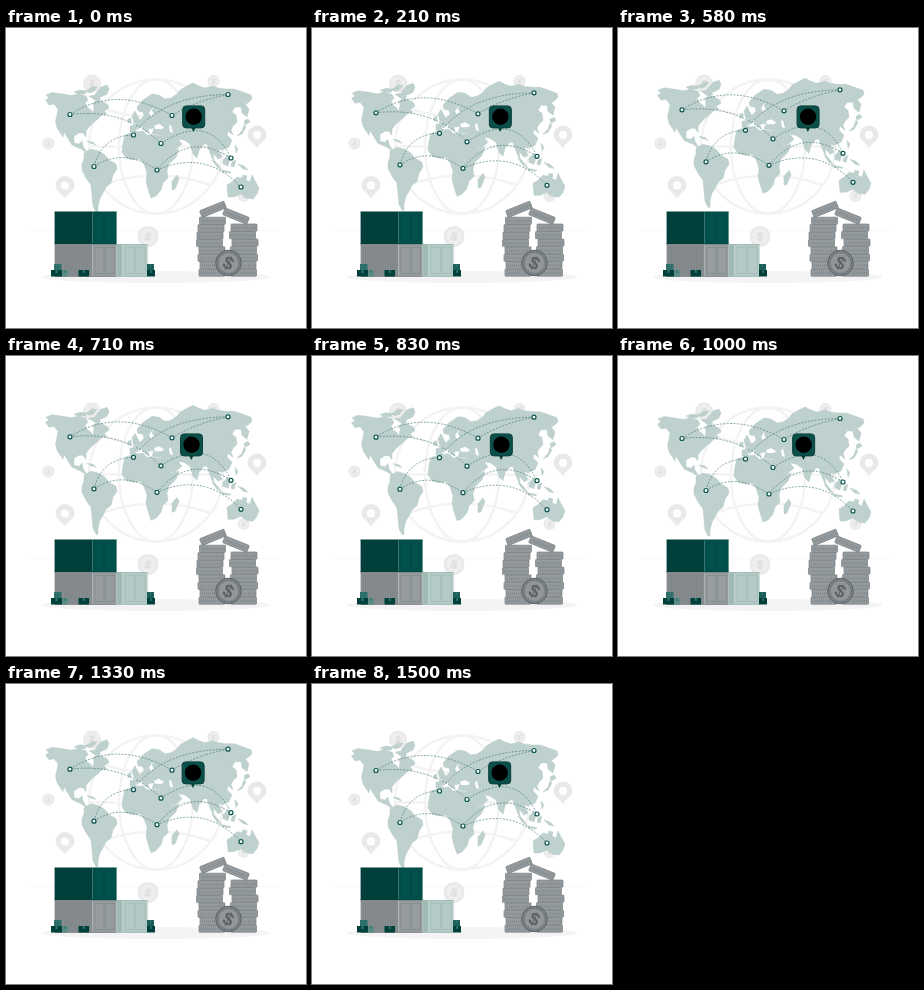
Recreate the animation shown at these times as an HTML page. Size 300x300 px, loop 1.54 s.

```html
<!DOCTYPE html>
<html lang="en">
<head>
<meta charset="utf-8">
<title>World shipping</title>
<style>
  html, body { margin: 0; width: 100%; height: 100%; overflow: hidden; background: #fff; }
  svg { display: block; width: 100vw; height: 100vh; }
  text { font-family: "Liberation Sans", Arial, sans-serif; font-weight: bold; text-anchor: middle; }
</style>
</head>
<body>
<svg viewBox="0 0 300 300">
  <g id="globe" fill="none" stroke="#f3f3f3" stroke-width="2.4">
    <circle cx="150" cy="118.5" r="67"/>
    <ellipse cx="150" cy="118.5" rx="37" ry="67"/>
    <path d="M83 118.500H217M96 80Q150 99 204 80M96 157Q150 138 204 157"/>
  </g>
  <path d="M23 202.500H273" stroke="#f3f3f3" stroke-width=".6"/>
  <g id="tokens"></g>

  <g id="map">
    <g fill="#bfd1cf" stroke="#aec4c1" stroke-width=".4" stroke-linejoin="round">
      <path d="M39.500 72L43 70 40 67 46 64.500 57 66 65 67.500 72 66 80 68 82 72 79 75 81 79 85 82 87 85 88 79 87 75 92 72 97 74 102 77 103 80 98 83 101 86 96 87 92 91 87 95 83 99 80 103 80 109 77 105 73 105 68 108 68 115 73 116 76 113 77 118 80 123 85 125 82 126 75 121 66 117 61 109 58 104 57 109 51 100 49.500 93 51 87 52 81 48 76 43 77Z"/>
      <path d="M68 64L74 62 81 63 79 66 72 66ZM80 63L86 59 91 59 88 63 83 65ZM83 68L90 67 95 71 90 73 86 70Z"/>
      <path d="M89 66L95 59 101 57 103 61 101 66 97 68 92 70Z"/>
      <path d="M81 113L87 114 90 117 84 115Z"/>
      <path d="M78 125L85 121 93 123 99 127 103 132 110 136 111 141 107 147 105 155 100 159 97 165 94 170 92 178 92 184 90 184 87 178 86 168 85 157 80 150 76 142 76 136 78 131Z"/>
      <path d="M126 88L129 83 132 89 134 93 128 95ZM122 91L125 90 125 94 122 95Z"/>
      <path d="M119 107L128 104 137 103 141 107 148 107 155 108 159 116 164 123 173 121 170 129 163 136 161 143 162 150 157 155 155 162 150 168 145 170 142 161 140 153 141 145 138 136 134 131 127 132 120 130 116 124 117 115Z"/>
      <path d="M171 147L173 151 169 161 166 162 166 153Z"/>
      <path d="M124 104L124 98 130 97 129 94 134 92 138 88 137 84 132 83 131 79 137 72 146 66 153 67 159 71 165 70 171 66 174 62 181 58 187 55 193 58 199 60 207 58 212 60 220 61 228 61 234 63 245 67 246 71 242 75 239 76 243 81 241 89 236 85 235 79 229 79 226 84 230 87 231 94 227 98 225 102 227 107 222 103 221 107 226 112 223 119 216 122 212 121 216 129 212 131 207 125 208 132 213 138 208 134 204 125 201 116 198 116 193 122 191 130 187 126 184 116 178 112 172 111 176 116 170 121 162 123 156 114 155 107 146 106 148 100 142 101 143 105 139 103 135 98 130 101 128 105Z"/>
      <path d="M238 93L242 91 244 94 239 97ZM238 97L240 99 236 106 231 108 236 103ZM229 117L232 121 230 125ZM206 132L211 136 216 142 211 139ZM217 132L222 127 224 131 222 138 217 136ZM216 142L225 144 224 145 216 144ZM226 134L230 132 228 139 225 138ZM232 136L238 138 242 142 237 141Z"/>
      <path d="M221 157L226 154 231 149 236 150 237 147 241 148 240 152 244 154 246 147 249 153 253 160 251 166 247 171 240 170 235 166 228 169 222 169Z"/>
      <path fill="#fff" stroke="none" d="M143 85L145 82 147 79 146 83 148 86 145 88ZM148 98L153 96 158 99 156 101 149 101ZM163 98L165 97 167 105 164 104Z"/>
    </g>
    <path fill="none" stroke="#356d68" stroke-width=".6" stroke-dasharray="2 1.4"
      d="M64 86.500Q111 56 166 87.500M64 86.500Q119 80 155 115.500M127 107Q157 67 222 66.500M166 87.500Q189 73 222 66.500M88 138.500Q96 108 127 107M88 138.500Q117 119 151 142M155 115.500Q203 84 225 130M151 142Q183 103 225 130M151 142Q199 121 235 159"/>
    <g id="stops"></g>
  </g>

  <g id="pin">
    <path d="M185 99H190L187.500 104Z" fill="#073c38"/>
    <rect x="176.700" y="77.900" width="22" height="22" rx="3.500" fill="#0b4f49" stroke="#0a403c"/>
    <circle cx="187.700" cy="88.700" r="8.200"/>
  </g>

  <ellipse cx="150" cy="249" rx="115" ry="6" fill="#f4f4f4"/>
  <g id="cargo"></g>
  <g id="coins"></g>
</svg>
<script>
const $ = id => document.getElementById(id);
const add = (id, html) => $(id).insertAdjacentHTML("beforeend", html);
const rect = (x, y, w, h, fill, more = "") =>
  `<rect x="${x}" y="${y}" width="${w}" height="${h}" fill="${fill}" ${more}/>`;

// Pale coins and location pins behind the map
for (const [x, y, r] of [[86, 55.5, 9], [207.5, 53, 6], [42.5, 115.5, 6], [237.5, 168, 6], [142, 208.5, 10.5]])
  add("tokens", `<circle cx="${x}" cy="${y}" r="${r}" fill="#e9e9e9"/>
    <circle cx="${x}" cy="${y}" r="${r * .78}" fill="#eee"/>
    <text x="${x}" y="${y + r * .4}" font-size="${r * 1.15}" fill="#dcdcdc" transform="rotate(18 ${x} ${y})">$</text>`);
for (const [x, y] of [[59, 157.5], [251, 107]])
  add("tokens", `<path transform="translate(${x} ${y})" fill="#e9e9e9"
    d="M0 13C-3 8-9.500 5-9.500 0A9.500 9.500 0 0 1 9.500 0C9.500 5 3 8 0 13Z"/>
    <circle cx="${x}" cy="${y}" r="4" fill="#fff"/>`);

for (const [x, y] of [[64, 86.5], [222, 66.5], [166, 87.5], [127.5, 107], [155, 115.5], [225, 130], [88, 138.5], [151, 142], [235, 159]])
  add("stops", `<circle cx="${x}" cy="${y}" r="2" fill="#fff" stroke="#0a544e" stroke-width="1.2"/>`);

// Containers: ribbed side on the left, framed doors on the right
function container(x, y, side, doors, fill, doorFill, line) {
  const split = x + side;
  let html = rect(x, y, side, 32.5, fill) + rect(split, y, doors, 32.5, doorFill);
  for (let i = x + 2; i < split - 1; i += 2.5) html += rect(i, y + 2, .7, 28.5, line);
  for (const dx of [.1, .53])
    html += rect(split + doors * dx, y + 3, doors * .37, 26.5, "none", `stroke="${line}" stroke-width=".6"`);
  add("cargo", html + rect(x, y, side + doors, .8, line) + rect(x, y + 31.7, side + doors, .8, line));
}
container(48.6, 183.7, 38, 24, "#003d39", "#00524b", "#00453f");
container(48.6, 216.2, 38, 24, "#878d8f", "#979d9e", "#7c8385");
container(110.6, 216.2, 6, 25, "#9fb9b5", "#b5cac7", "#9fb9b5");
for (const [x, y, w, h, fill] of [
  [45, 242, 11, 6.5, "#00403b"], [48, 236, 7.5, 6, "#2f6f69"], [56, 242, 6, 6.5, "#5c8a86"],
  [72.5, 242, 10.5, 6.5, "#00403b"], [141, 236, 7, 6, "#1c5f59"], [141, 242, 8, 6.5, "#00403b"]])
  add("cargo", rect(x, y, w, h, fill) + rect(x + w * .4, y, w * .2, 3, "#2d716b"));

// Coin stacks
function coin(x, y, turn = 0, w = 26) {
  let html = rect(0, 0, w, 7.2, "#959b9e", 'rx=".8" stroke="#767c7f" stroke-width=".7"');
  for (let i = 2; i < w - 1; i += 2) html += rect(i, 2.4, .7, 3, "#7f8588");
  add("coins", `<g transform="translate(${x} ${y}) rotate(${turn} ${w / 2} 3.6)">${html}</g>`);
}
[1, 2, 0, 1, -1.5, -1, 0, 1.5].forEach((dx, i) => coin(192 + dx, 241 - i * 7.4));
[0, -.5, 1, 0, 1.5, -1, .5].forEach((dx, i) => coin(224.5 + dx, 241 - i * 7.5));
coin(194, 177.7, -22);
coin(217, 184.5, 22);
add("coins", `<circle cx="222.5" cy="235" r="12.8" fill="#7b8184" stroke="#5d6365"/>
  <circle cx="222.5" cy="235" r="10.4" fill="#90969a" stroke="#6b7173" stroke-width=".7"/>
  <text x="222.5" y="241.3" font-size="18" fill="#5a6063" transform="rotate(25 222.5 235)">$</text>`);

const LOOP = 1540, CYCLE = 1500;
const shake = [0, -.6, 1.2, -2.4, 2.4, -2.4, 2.4, -2.4, 1.2, -.6, 0];

// cubic-bezier(.25, .1, .25, 1), solved by bisection
function ease(p) {
  const bez = (a, b, s) => 3 * a * s * (1 - s) ** 2 + 3 * b * s * s * (1 - s) + s ** 3;
  let lo = 0, hi = 1;
  for (let i = 0; i < 20; i++) {
    const mid = (lo + hi) / 2;
    if (bez(.25, .25, mid) < p) lo = mid; else hi = mid;
  }
  return bez(.1, 1, lo);
}

function draw() {
  const u = Math.min(performance.now() % LOOP / CYCLE, 1);
  const i = Math.min(Math.floor(u * 10), 9);
  const sway = shake[i] + (shake[i + 1] - shake[i]) * ease(u * 10 - i);
  const lift = 6 * (1 - Math.abs(1 - 2 * u));
  $("map").setAttribute("transform", `translate(0 ${-lift})`);
  $("pin").setAttribute("transform", `translate(${sway} 0)`);
  requestAnimationFrame(draw);
}
draw();
</script>
</body>
</html>
```
